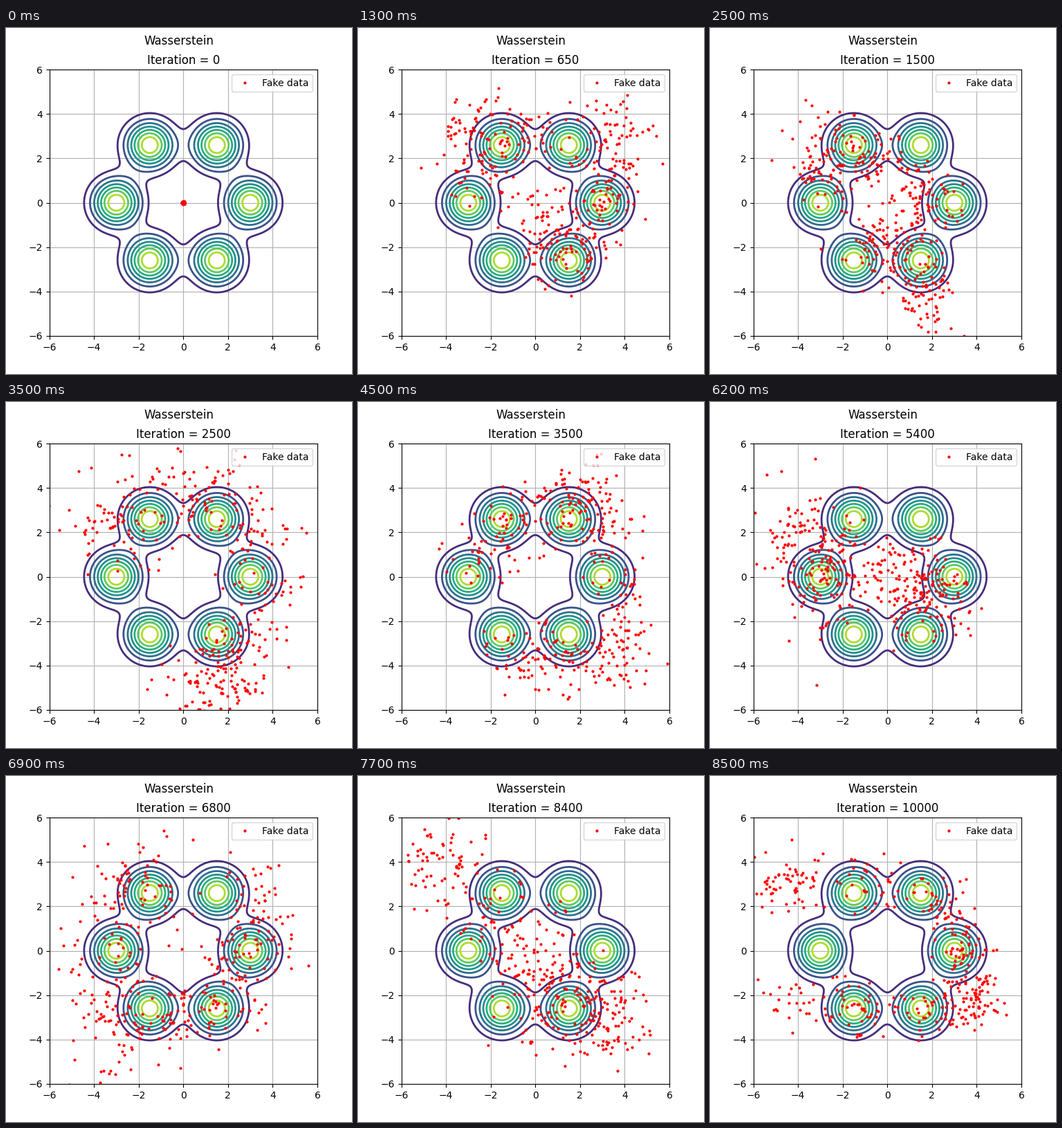
Recreate the animation shown at these times as a matplotlib script. Size 500x500 px, loop 8600 ms.

```python
import numpy as np
import matplotlib.pyplot as plt
from matplotlib.animation import FuncAnimation

FRAMES, INTERVAL = 86, 100
COUNT = 400

rng = np.random.default_rng(4)
along = rng.uniform(0, 1, COUNT)
noise = rng.normal(size=(2, COUNT))


def cloud(spread, *path):
    """Scatter the samples along a path of waypoints."""
    knots = np.linspace(0, 1, len(path))
    return np.array([np.interp(along, knots, c) for c in zip(*path)]) + spread * noise


# time step -> cloud of samples
POSES = {
    0: 0.02 * noise,
    13: cloud(.8, (-2.5, .5), (-3, 3.2), (-1, 3), (4, 3.4), (3.2, .2),
              (1.4, -2.6), (0, 0)),
    25: cloud(.7, (-3.2, 3.4), (-3, .7), (-1.4, 2.5), (.3, 1.4), (2.8, -.2),
              (-1.2, -2), (1.3, -2.6), (2.2, -5.4)),
    45: cloud(.75, (-3, .4), (-1.2, 2.3), (1.4, 2.8), (2.5, 4.7), (3.8, .2),
              (4, -4), (1.4, -3.4), (-1.4, -3.6)),
    55: cloud(.45, (-5, -.8), (-2.9, .1), (-1.5, .8), (-.6, 2.6), (-.5, 4.4),
              (1.6, 1), (-.5, -1.4), (-1.6, -2.6)),
    69: cloud(1, (-2.4, 4.4), (-1.6, 2.6), (-4, .3), (-3.4, -4), (-1.3, -2.7),
              (1.4, -2.8), (3.1, .3), (3.4, 3)),
    85: cloud(.6, (-5.8, 2.8), (-3.6, 3.2), (2.4, 2.5), (3.5, 0), (4.3, -2.6),
              (1.6, -2.6), (-5.2, -2.2)),
}
TIMES = list(POSES)


def iteration(i):
    """The logging step grows from 50 to 100 to 200."""
    return 50 * min(i, 20) + 100 * min(max(i - 20, 0), 40) + 200 * max(i - 60, 0)


def samples(i):
    k = min(np.searchsorted(TIMES, i, side="right") - 1, len(TIMES) - 2)
    a, b = TIMES[k], TIMES[k + 1]
    s = (i - a) / (b - a)
    mix = s ** 0.6 if k == 0 else s
    pts = (1 - mix) * POSES[a] + mix * POSES[b]
    # the cloud swells and swirls on its way to the next pose
    swell = 1 + 0.35 * np.sin(np.pi * s)
    turn = 0.4 * np.sin(2 * np.pi * s)
    c, n = np.cos(turn), np.sin(turn)
    return swell * np.array([[c, -n], [n, c]]) @ pts


def density(x, y):
    angles = np.arange(6) * np.pi / 3
    return sum(np.exp(-(x - 3 * np.cos(a)) ** 2 - (y - 3 * np.sin(a)) ** 2)
               for a in angles) / np.pi


fig, ax = plt.subplots(figsize=(5, 5), dpi=100)
fig.suptitle("Wasserstein")
title = ax.set_title("Iteration = 0")

axis = np.linspace(-6, 6, 241)
gx, gy = np.meshgrid(axis, axis)
ax.contour(gx, gy, density(gx, gy), levels=0.04 * np.arange(1, 8),
           cmap="viridis", vmin=0, vmax=0.32, linewidths=2)
dots, = ax.plot([], [], "r.", markersize=4, label="Fake data")
ax.set(xlim=(-6, 6), ylim=(-6, 6))
ax.grid(True)
ax.legend(loc="upper right")


def update(i):
    dots.set_data(*samples(i))
    title.set_text(f"Iteration = {iteration(i)}")
    return dots, title


anim = FuncAnimation(fig, update, frames=FRAMES, interval=INTERVAL,
                     init_func=lambda: update(0), repeat=True, repeat_delay=0)
plt.show()
```
